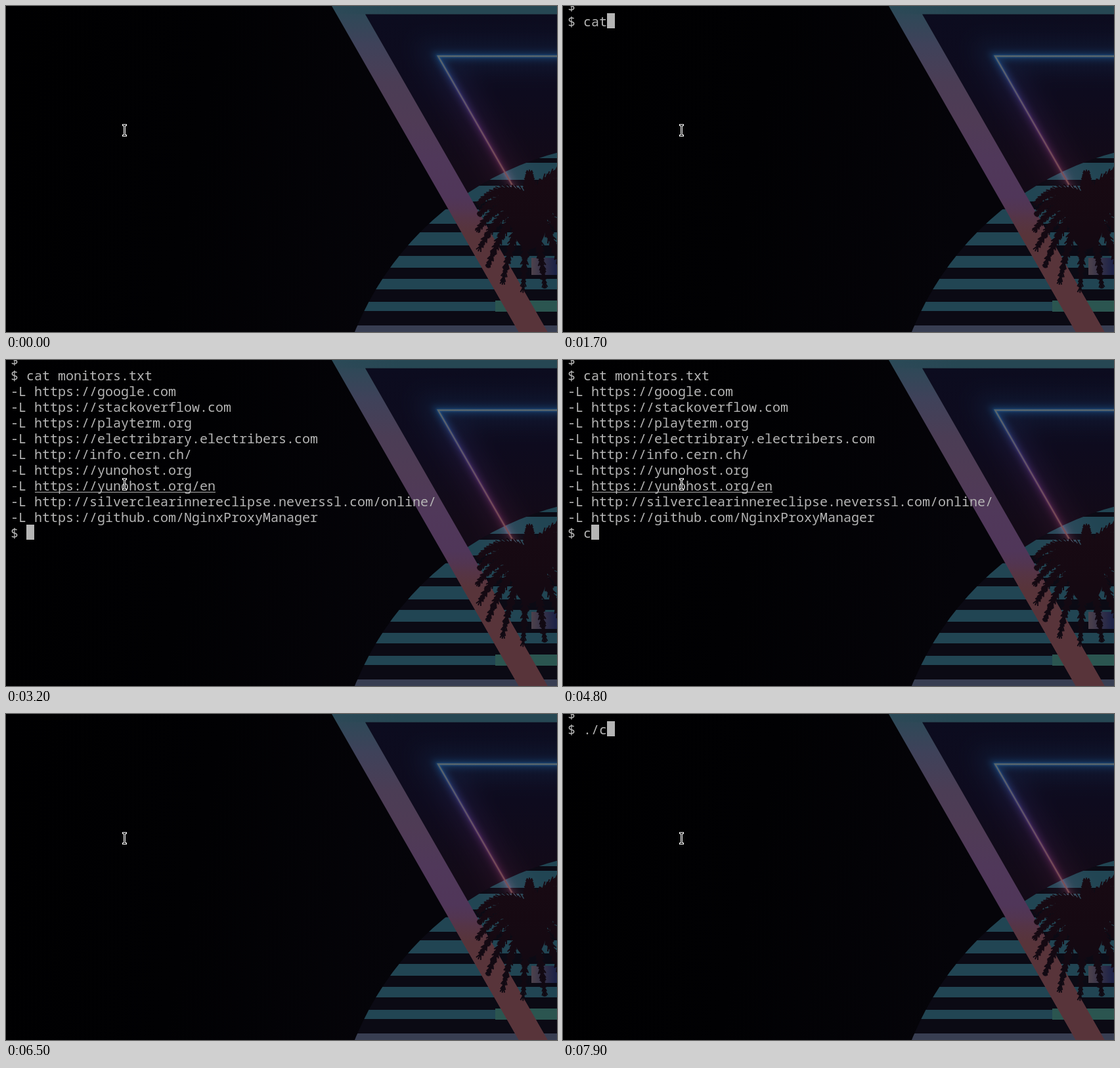
Recreate the animation shown at these times as an HTML page with a canvas. Size 839 by 497 pixels, loop 8000 ms.

```html
<!DOCTYPE html>
<html lang="en">
<head>
<meta charset="utf-8">
<title>Terminal session</title>
<style>
html, body { margin: 0; width: 100%; height: 100%; overflow: hidden; background: #000; }
canvas { display: block; }
</style>
</head>
<body>
<canvas id="stage" width="839" height="497"></canvas>
<script>
const W = 839, H = 497, LOOP = 8000;
const CELL = 12, ROW = 24, LEFT = 7, TOP = 11, BASE = 20;
const SLOPE = 0.573;                       // sideways run of both triangles per pixel down
const SUN = { x: 958, y: 668, r: 460, top: 203.6, step: 35.4 };
const CROWN = { x: 797, y: 294 };
const ctx = document.getElementById('stage').getContext('2d');

const LINKS = [
  'https://google.com',
  'https://stackoverflow.com',
  'https://playterm.org',
  'https://electribrary.electribers.com',
  'http://info.cern.ch/',
  'https://yunohost.org',
  'https://yunohost.org/en',
  'http://silverclearinnereclipse.neverssl.com/online/',
  'https://github.com/NginxProxyManager'
];
const HOVERED = 6;

// Vertical or horizontal gradient; colors are spread evenly.
function ramp(g, x0, y0, x1, y1, ...colors) {
  const grad = g.createLinearGradient(x0, y0, x1, y1);
  colors.forEach((c, i) => grad.addColorStop(i / (colors.length - 1), c));
  return grad;
}

// Everything to the right of a slanted edge that starts at (x, y).
function slanted(x, y) {
  const p = new Path2D();
  p.moveTo(x, y);
  p.lineTo(W, y);
  p.lineTo(W, H);
  p.lineTo(x + (H - y) * SLOPE, H);
  p.closePath();
  return p;
}

const OUTER = slanted(496, 0), INNER = slanted(547, 12.5);

function drawSky(g) {
  g.fillStyle = ramp(g, 0, 0, 640, 120, '#000001', '#010103', '#050409');
  g.fillRect(0, 0, W, H);
  g.fillStyle = ramp(g, 0, 12, 0, H, '#0c0c1f', '#0e0b1e', '#130a17', '#110a16', '#0d0a13');
  g.fill(INNER);
}

function drawSun(g) {
  g.save();
  g.beginPath();
  g.arc(SUN.x, SUN.y, SUN.r, 0, Math.PI * 2);
  g.clip();
  g.fillStyle = '#0b0a14';
  g.fillRect(0, 0, W, H);
  for (let i = 0; i < 9; i++) {
    g.fillStyle = i < 8 ? '#214553' : '#383e52';
    g.fillRect(0, Math.round(SUN.top + i * SUN.step), W, 28 - 2 * i);
  }
  g.restore();
  g.fillStyle = '#2b5550';
  g.fillRect(745, 449, W, 17);
}

function drawBand(g) {
  const frame = new Path2D(OUTER);
  frame.addPath(INNER);
  g.fillStyle = ramp(g, 0, 0, 0, 350,
    '#2a4a57', '#3f425a', '#4b3d55', '#4f3b55', '#50385a', '#503659', '#583440');
  g.fill(frame, 'evenodd');
  g.save();
  g.clip(frame, 'evenodd');
  g.fillStyle = ramp(g, 0, 310, 0, 350, '#57343f00', '#58343a');
  g.fillRect(0, 310, W, H);
  g.fillStyle = ramp(g, 500, 0, 600, 0, '#26475300', '#264753');
  g.fillRect(0, 0, W, 12.5);
  g.restore();
}

function drawNeon(g) {
  const tube = (width, style, blur, alpha) => {
    g.globalAlpha = alpha;
    g.filter = blur ? `blur(${blur}px)` : 'none';
    g.strokeStyle = style;
    g.lineWidth = width;
    g.beginPath();
    g.moveTo(W + 30, 76.5);
    g.lineTo(658, 76.5);
    g.lineTo(658 + 217 * SLOPE, 293);
    g.stroke();
  };
  const halo = ramp(g, 0, 76, 0, 290, '#0d4668', '#2c2c5c', '#43204e', '#4a1c38', '#50262c');
  const core = ramp(g, 0, 74, 0, 290, '#5f696a', '#5e5c6c', '#6e5464', '#784e56', '#7f5250');
  g.save();
  g.clip(INNER);
  g.globalCompositeOperation = 'lighter';
  tube(40, halo, 17, 0.2);
  tube(12, halo, 5, 0.4);
  tube(4, halo, 1.5, 0.45);
  g.globalCompositeOperation = 'source-over';
  tube(2.4, core, 0, 0.9);
  g.restore();
}

// A frond bows out from the crown, with leaflets swept towards its tip.
function frond(g, angle, reach, lift) {
  const dx = Math.cos(angle) * reach, dy = Math.sin(angle) * reach;
  const cx = dx * 0.55, cy = dy * 0.55 - lift, n = 36;
  g.beginPath();
  for (let i = 1; i <= n; i++) {
    const t = i / n, u = 1 - t;
    const x = CROWN.x + 2 * u * t * cx + t * t * dx;
    const y = CROWN.y + 2 * u * t * cy + t * t * dy;
    const dir = Math.atan2(u * cy + t * (dy - cy), u * cx + t * (dx - cx));
    const len = 20 * (1 - 0.6 * t) * (0.85 + 0.25 * Math.sin(i * 2.4 + angle * 9));
    for (const side of [-0.5, 0, 0.5]) {
      g.moveTo(x, y);
      g.lineTo(x + len * Math.cos(dir + side), y + len * Math.sin(dir + side) + 1);
    }
  }
  g.stroke();
}

function drawPalm(g) {
  g.fillStyle = ramp(g, 800, 0, W, 0, '#4d424c', '#1a2046');
  g.fillRect(800, 384, W, 26);
  g.strokeStyle = g.fillStyle = ramp(g, 0, 250, 0, 430, '#180a13', '#150912', '#0f0912');
  g.lineWidth = 2;
  for (let deg = 178; deg > -40; deg -= 14) {
    const a = deg * Math.PI / 180;
    frond(g, a, 73 + 62 * Math.sin(a) ** 2, 28);
  }
  frond(g, -Math.PI / 2, 38, 0);
  g.beginPath();
  g.ellipse(CROWN.x, 325, 27, 46, 0, 0, Math.PI * 2);
  g.fill();
}

const scene = document.createElement('canvas');
scene.width = W;
scene.height = H;
const back = scene.getContext('2d');
[drawSky, drawSun, drawBand, drawNeon, drawPalm].forEach(draw => draw(back));

function line(text, row) {
  ctx.fillText(text, LEFT, TOP + BASE + row * ROW);
}

function prompt(text, row, active = true) {
  line('$ ' + text, row);
  if (active) ctx.fillRect(LEFT + (2 + text.length) * CELL, TOP + row * ROW, CELL, 23);
}

// Characters appear one per 100 ms, the first one at the given start.
function typed(text, start, t) {
  return text.slice(0, Math.max(0, Math.floor((t - start) / 100) + 1));
}

function catCommand(t) {
  if (t >= 2300) return 'cat monitors.txt ';
  return typed('cat', 1500, t) + typed(' mo', 1900, t);
}

function drawTerminal(t) {
  ctx.font = '20px "Noto Sans Mono", "DejaVu Sans Mono", monospace';
  ctx.fillStyle = '#b5b5b5';
  const cleared = t >= 6500;
  const [first, next] = cleared ? [6700, 7000] : [400, 800];
  if (t < first) return;
  prompt('', -1, t < next);
  if (t < next) return;
  if (cleared) return prompt(typed('./c', 7700, t), 0);
  prompt(catCommand(t), 0, t < 3200);
  if (t < 3200) return;
  LINKS.forEach((url, i) => line('-L ' + url, i + 1));
  ctx.fillRect(LEFT + 3 * CELL + 1, TOP + (HOVERED + 1) * ROW + 22,
    LINKS[HOVERED].length * CELL - 1, 1);
  prompt(typed('clear', 4800, t), LINKS.length + 1);
}

// Text pointer: a pale I-beam with a thin dark centre.
function drawPointer() {
  const beam = (color, grow) => {
    ctx.fillStyle = color;
    const bar = (x, y, w, h) =>
      ctx.fillRect(x - grow, y - grow, w + 2 * grow, h + 2 * grow);
    bar(178, 181, 5, 1);
    bar(180, 181, 1, 17);
    bar(178, 197, 5, 1);
  };
  beam('#fff', 1);
  beam('#000', 0);
}

const begin = performance.now();
function frame(now) {
  ctx.drawImage(scene, 0, 0);
  drawTerminal(Math.max(0, now - begin) % LOOP);
  drawPointer();
  requestAnimationFrame(frame);
}
frame(begin);
</script>
</body>
</html>
```
